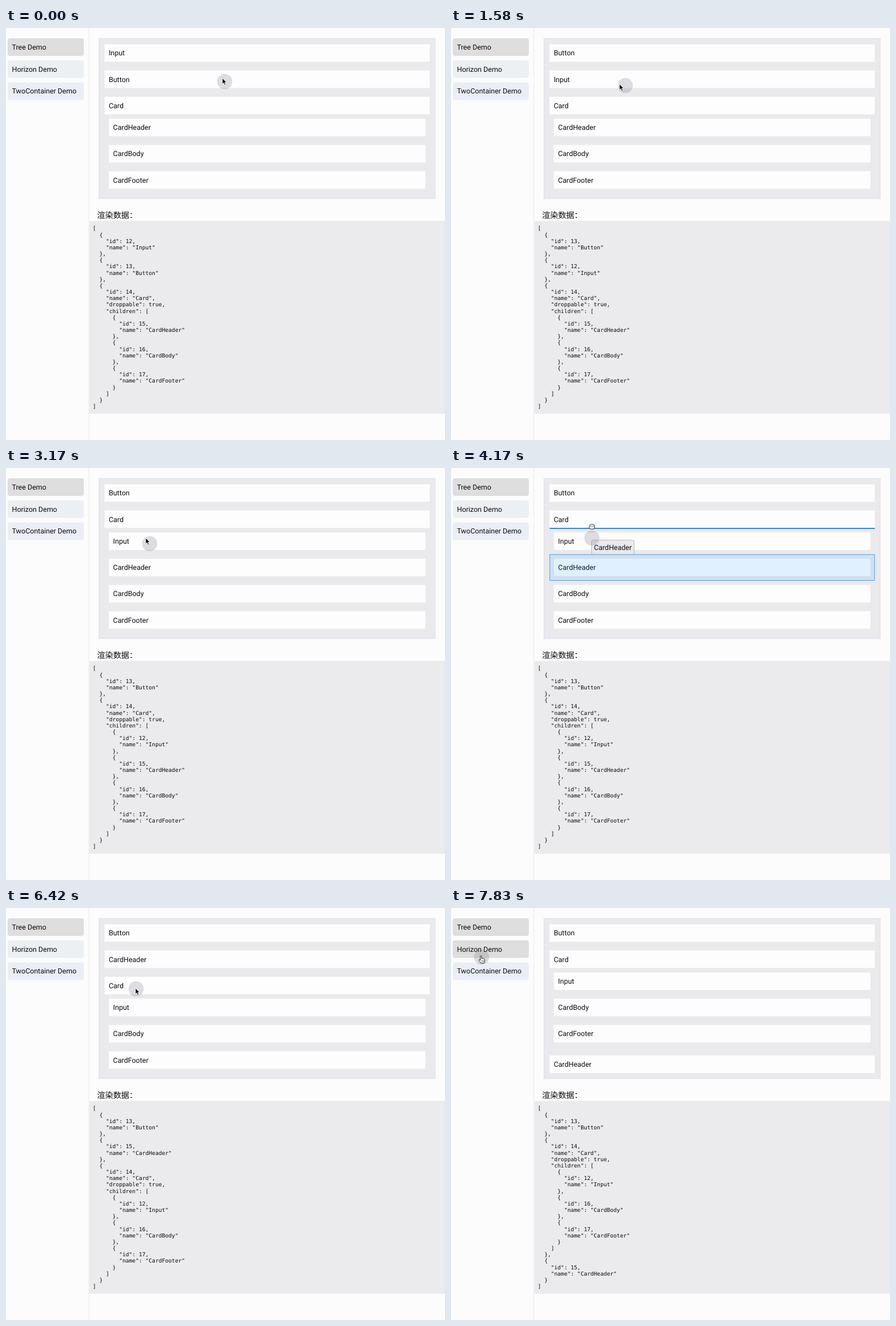
Write an HTML page that moves like this. It is 773 px wide and 724 px high and loops after 8 s.

```html
<!DOCTYPE html>
<html lang="zh-CN">
<head>
<meta charset="utf-8">
<title>Tree Demo</title>
<style>
  html, body { margin: 0; width: 100%; height: 100%; overflow: hidden; background: #fcfcfd; }
  svg { display: block; width: 773px; height: 724px; }
  text { font: 12.5px Roboto, "Liberation Sans", sans-serif; fill: #0c0c0e; white-space: pre; text-rendering: geometricPrecision; }
  #json text { font: 9.63px "DejaVu Sans Mono", monospace; }
  #title { font: 500 14.2px "Noto Sans CJK SC", "Noto Sans CJK", sans-serif; }
</style>
</head>
<body>
<svg viewBox="0 0 773 724" xmlns="http://www.w3.org/2000/svg">
  <rect width="773" height="724" fill="#fcfcfd"/>
  <rect x="144.5" width="2.3" height="724" fill="#f3f3f1"/>
  <g id="menu"></g>
  <rect x="164.2" y="18.8" width="591.2" height="280.6" fill="#eaeaec" stroke="#e5e5ed" stroke-width="2.2"/>
  <g id="tree"></g>
  <text id="title" x="160.3" y="333.6">渲染数据：</text>
  <rect x="146.5" y="339" width="627" height="338.8" fill="#ebebed"/>
  <g id="json"></g>
  <rect id="mark" fill="rgba(24,144,255,.12)" stroke="#4a9fe8"/>
  <rect id="line" height="1.7" fill="#1b72da"/>
  <g id="ghost">
    <rect x="0" y="0" height="25" rx="3" fill="#e9e9eb" fill-opacity=".94" stroke="#b4b4b8" stroke-width=".9"/>
    <text x="4.3" y="17"></text>
  </g>
  <circle id="halo" r="13.3" fill="#50505c" fill-opacity=".18"/>
  <g id="arrow">
    <path d="M0 0V10.2L2.3 8.1L4 12L5.8 11.2L4.1 7.5H7.3Z" fill="#000" stroke="#fff" stroke-width=".8"/>
  </g>
  <g id="fist" fill="#fff" stroke="#111" stroke-width=".9" stroke-linejoin="round">
    <path d="M-3.2 4.5C-4 2.5 -5 1.5 -4.8 .2Q-4.4 -.8 -3.4 -.4V-2.6Q-2.6 -4.4 -1.4 -3.3Q-.3 -4.8 .8 -3.5Q2 -4.5 2.9 -3Q4.6 -3.2 4.6 -1.4V1.2Q4.6 3 3.6 4.5Z"/>
    <path d="M-1.4 -1.3V.6M.7 -1.3V.6M2.8 -1.3V.6" fill="none" stroke-width=".7"/>
  </g>
  <g id="hand" fill="#fff" stroke="#111" stroke-width=".9" stroke-linejoin="round">
    <path d="M-1.3 7V1Q-1.2 -.2 -.2 -.2T.9 1V4.6Q2.1 3.8 2.9 4.9Q4 4.2 4.8 5.3Q6.4 5 6.4 6.8V9Q6.2 11 5.2 12.8H-.6Q-1.6 10.6 -3.6 8.6Q-4.6 7.2 -3.4 6.6Q-2.4 6.4 -1.3 8Z"/>
    <path d="M1 8V10.6M2.9 8V10.6M4.7 8V10.6" fill="none" stroke-width=".6"/>
  </g>
</svg>
<script>
const LOOP = 8000, STEP = 1000 / 12;
const GAP = 7.69, ROW = 30.77, TOP = 20.9, PITCH = ROW + 2 * GAP;
const $ = id => document.getElementById(id);
const set = (el, attrs) => { for (const k in attrs) el.setAttribute(k, attrs[k]); };
const show = (el, on) => set(el, { visibility: on ? "visible" : "hidden" });
const move = (el, x, y) => set(el, { transform: `translate(${x} ${y})` });
const rect = (x, y, w, h, fill, extra = "") =>
  `<rect x="${x}" y="${y}" width="${w}" height="${h}" fill="${fill}" ${extra}/>`;
const label = (x, y, s) => `<text x="${x}" y="${y}">${s}</text>`;

const node = (id, name) => ({ id, name });
const input = node(12, "Input"), button = node(13, "Button"), header = node(15, "CardHeader"),
      body = node(16, "CardBody"), footer = node(17, "CardFooter");
const card = (...children) => ({ id: 14, name: "Card", droppable: true, children });

// Each tree holds from the given step on.
const states = [
  [0, [input, button, card(header, body, footer)]],
  [17, [button, input, card(header, body, footer)]],
  [32, [button, card(input, header, body, footer)]],
  [60, [button, header, card(input, body, footer)]],
  [88, [button, card(input, body, footer), header]]
];

// Drop lines: [step, y, depth]
const edge = n => TOP + n * PITCH;
const cardEnd = edge(6) - GAP / 2 + 3.9;
const drags = [
  { from: 6, arrow: 15, to: 17, name: "Input", y: edge(0), h: PITCH, depth: 0,
    lines: [[8, edge(1), 0], [10, edge(2), 0]] },
  { from: 23, arrow: 29, to: 32, name: "Input", y: edge(1), h: PITCH, depth: 0,
    lines: [[25, edge(2), 0], [27, cardEnd, 0], [29, edge(3) - GAP, 1]] },
  { from: 49, arrow: 59, to: 60, name: "CardHeader", y: edge(3) - GAP, h: PITCH, depth: 1,
    lines: [[50, edge(2) - GAP, 1], [51, cardEnd, 0], [52, edge(1), 0]] },
  { from: 79, arrow: 86, to: 88, name: "Card", y: edge(2), h: 4 * PITCH, depth: 0,
    lines: [[84, edge(1), 0]] }
];

// Pointer path: [step, x, y]
const path = [
  [-1, 391, 102], [0, 385, 94], [1, 380, 86], [4, 351, 46], [6, 351, 46], [8, 345, 73], [9, 345, 73],
  [10, 342, 93], [11, 342, 93], [13, 342, 102], [17, 342, 102], [19, 307, 101], [21, 276, 96],
  [23, 276, 96], [29, 277, 163], [33, 277, 163], [37, 268, 148], [38, 253, 133], [39, 243, 118],
  [41, 238, 100], [47, 246, 170], [48, 246, 170], [49, 248, 158], [50, 248, 123], [51, 248, 90],
  [54, 248, 71], [55, 248, 71], [56, 248, 68], [61, 248, 68], [66, 270, 125], [68, 264, 155],
  [71, 253, 129], [73, 247, 102], [75, 237, 120], [76, 237, 120], [77, 229, 142], [81, 229, 142],
  [83, 258, 104], [85, 275, 88], [89, 275, 88], [92, 105, 89], [94, 54, 86]
];

function pointer(s) {
  const i = path.findIndex(p => p[0] > s);
  if (i < 0) return path[path.length - 1].slice(1);
  if (i === 0) return path[0].slice(1);
  const [a, ax, ay] = path[i - 1], [b, bx, by] = path[i], f = (s - a) / (b - a);
  return [ax + (bx - ax) * f, ay + (by - ay) * f];
}

const last = (list, s) => list.filter(e => e[0] <= s).pop();

function treeMarkup(list) {
  let y = TOP, out = "";
  const row = (name, depth) => {
    const x = 173.5 + depth * GAP;
    out += rect(x, y + GAP, 572.6 - 2 * depth * GAP, ROW, "#fdfdfe") + label(x + 7.4, y + GAP + 19.9, name);
  };
  for (const n of list) {
    row(n.name, 0);
    y += PITCH;
    if (!n.children) continue;
    y -= GAP;
    for (const c of n.children) { row(c.name, 1); y += PITCH; }
    y += GAP;
  }
  return out;
}

function jsonMarkup(list) {
  return JSON.stringify(list, null, 2).split("\n")
    .map((s, i) => label(152.8, 355.4 + i * 11.165, s)).join("");
}

$("menu").innerHTML = [["Tree", "#dedede"], ["Horizon", "#edf0f3"], ["TwoContainer", "#ebeef6"]]
  .map(([s, c], i) => rect(3, 18 + i * 38.7, 134, 31, c, 'rx="4"') + label(10.5, 38 + i * 38.7, s + " Demo"))
  .join("");
const horizon = $("menu").querySelectorAll("rect")[1];
const [ghostBox, ghostText] = $("ghost").children;
let tree = null;

function draw(ms) {
  const s = Math.floor((ms + 4) / STEP);
  const current = last(states, s)[1];
  if (current !== tree) {
    tree = current;
    $("tree").innerHTML = treeMarkup(tree);
    $("json").innerHTML = jsonMarkup(tree);
  }

  const [x, y] = pointer(s), [px, py] = pointer(s - 1);
  const resting = x === px && y === py;
  const [cx, cy] = resting ? [x, y] : pointer(s + 0.6); // the cursor runs ahead of its halo
  const hover = cx < 137;
  const drag = drags.find(d => s >= d.from && s < d.to);
  const line = drag && last(drag.lines, s);

  show($("mark"), drag);
  show($("ghost"), drag);
  show($("line"), line);
  if (drag) {
    const inset = drag.depth * GAP;
    set($("mark"), { x: 166.3 + inset, y: drag.y + 0.4, width: 587.2 - 2 * inset, height: drag.h - 0.6 });
    ghostText.textContent = drag.name;
    set(ghostBox, { width: ghostText.getComputedTextLength() + 8.6 });
    const [gx, gy] = pointer(s - 0.1);
    move($("ghost"), gx - 0.5, gy + 0.2);
  }
  if (line) {
    const inset = line[2] * GAP;
    set($("line"), { x: 166 + inset, y: line[1] - 0.2, width: 588 - 2 * inset });
  }

  const grab = drag && s < drag.arrow;
  show($("fist"), grab);
  show($("hand"), hover);
  show($("arrow"), !grab && !hover);
  move($("halo"), x, y);
  move($("fist"), cx, cy - 0.5);
  move($("hand"), cx - 1, cy - 2);
  move($("arrow"), cx - 1, cy - 1);
  set(horizon, { fill: hover ? "#dedede" : "#edf0f3" });
}

function tick() {
  draw(performance.now() % LOOP);
  requestAnimationFrame(tick);
}
tick();
</script>
</body>
</html>
```
